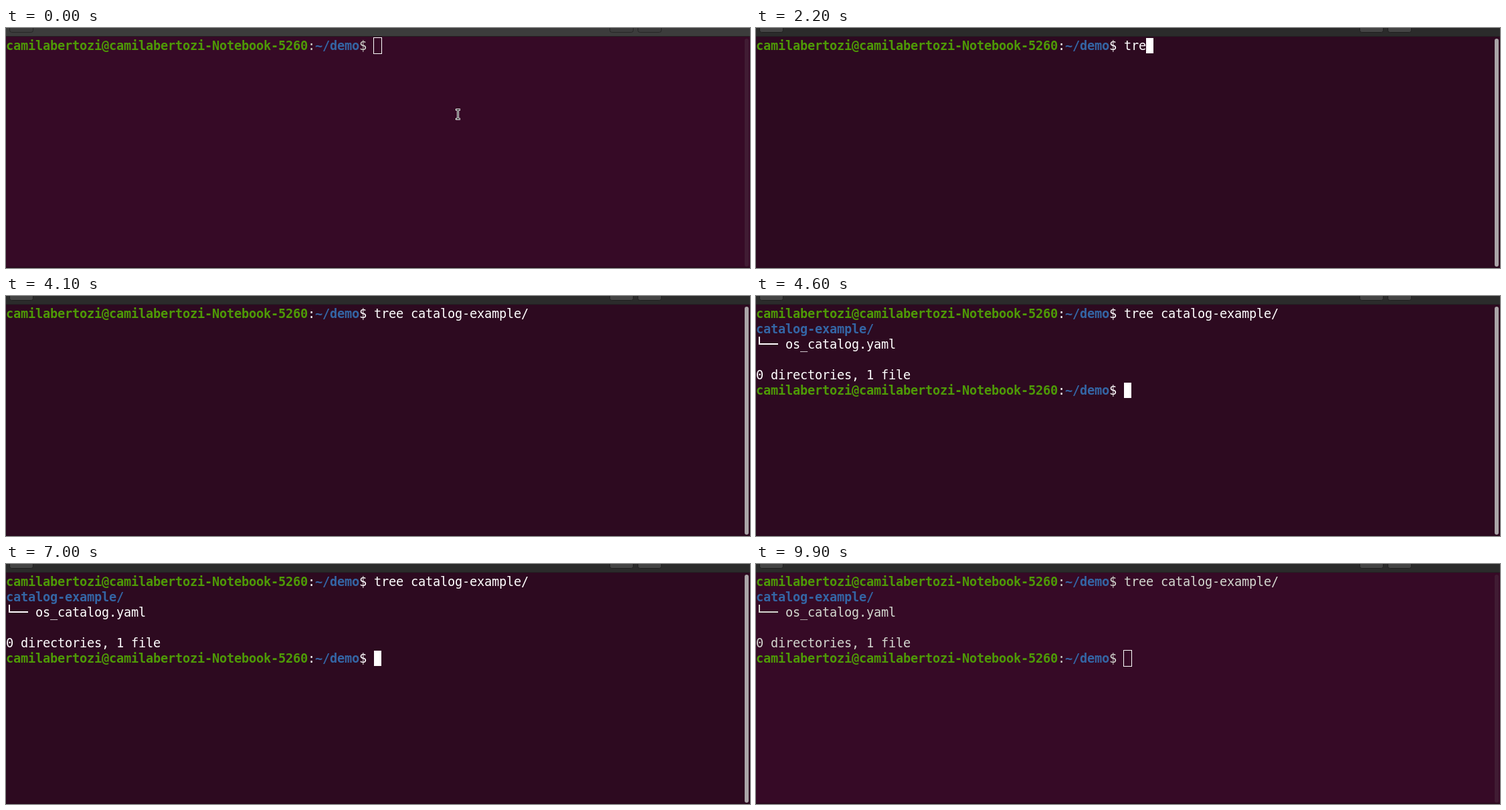
An HTML page for the animation above (10000 ms loop, 1112 by 360 pixels).

```html
<!DOCTYPE html>
<html lang="en">
<head>
<meta charset="utf-8">
<title>Terminal</title>
<style>
html, body { margin: 0; width: 100%; height: 100%; overflow: hidden; background: #2d0a20; }
svg { display: block; width: 1112px; height: 360px; --fg: #fff; --bg: #2d0a20; --bar: #2b2b2b; --btn: #444; --rim: #1f1f1f; }
svg.idle { --fg: #d3d7cf; --bg: #360a26; }
svg.dim { --bar: #3c3c3c; --btn: #3c3c3c; --rim: #262626; }
text { font: 18.667px "DejaVu Sans Mono", monospace; fill: var(--fg); }
.user, .dir { font-weight: bold; }
.user { fill: #4e9a06; }
.dir { fill: #3465a4; }
#bg { fill: var(--bg); }
#bar { fill: var(--bar); }
#buttons rect { fill: var(--btn); stroke: var(--rim); }
#scroll { fill: #aaa5a8; }
.idle #scroll { fill: #401c33; }
#branch { fill: none; stroke: var(--fg); stroke-width: 2; }
#block { fill: #fff; }
#hollow { fill: none; stroke: #fff; }
</style>
</head>
<body>
<svg id="stage" viewBox="0 0 1112 360">
  <rect id="bg" width="1112" height="360"/>
  <rect y="358" width="1112" height="2" fill="#2a0a1e"/>
  <rect id="bar" width="1112" height="13"/>
  <rect y="12" width="1112" height="1" fill="#222"/>
  <g id="buttons">
    <rect x="5.5" y="-20.5" width="35" height="27" rx="3"/>
    <rect x="902.5" y="-20.5" width="35" height="27" rx="3"/>
    <rect x="944.5" y="-20.5" width="35" height="27" rx="3"/>
  </g>
  <rect id="scroll" x="1104" y="16" width="6" height="342" rx="3"/>
  <g id="first"></g>
  <g id="output"><path id="branch" d="M5 61V72H33"/></g>
  <rect id="block" width="11" height="23"/>
  <rect id="hollow" width="12" height="24"/>
  <g id="beam" fill="none">
    <path d="M672 122.5H679M675.5 122V137M672 136.5H679" stroke="#fff" stroke-width="3"/>
    <path d="M673 122.5H678.5M675.5 122V137M673 136.5H678.5" stroke="#000"/>
  </g>
</svg>
<script>
const CELL = 11, LINE = 23, TOP = 15, ASCENT = 18, LOOP = 10000;
const COMMAND = "tree catalog-example/";
const HOST = "camilabertozi@camilabertozi-Notebook-5260";
const PROMPT_COLS = 50, ENTER = 4600, BLINK = 600;
// time and number of characters on the command line
const KEYS = [[1500, 1], [1700, 2], [2200, 3], [2400, 4], [2700, 5],
              [3000, 6], [3100, 7], [3200, 8], [3500, COMMAND.length]];
const $ = id => document.getElementById(id);
const stage = $("stage"), first = $("first"), output = $("output");
const block = $("block"), hollow = $("hollow"), beam = $("beam");

// one x per character keeps the text on the terminal grid
function write(parent, col, row, str, cls = "") {
  const el = document.createElementNS("http://www.w3.org/2000/svg", "text");
  el.setAttribute("x", [...str].map((_, i) => (col + i) * CELL).join(" "));
  el.setAttribute("y", TOP + row * LINE + ASCENT);
  el.setAttribute("class", cls);
  el.textContent = str;
  parent.append(el);
  return el;
}

function prompt(parent, row) {
  write(parent, 0, row, HOST, "user");
  write(parent, 41, row, ":");
  write(parent, 42, row, "~/demo", "dir");
  write(parent, 48, row, "$");
}

prompt(first, 0);
const command = write(first, PROMPT_COLS, 0, COMMAND);
write(output, 0, 1, "catalog-example/", "dir");
write(output, 4, 2, "os_catalog.yaml");
write(output, 0, 4, "0 directories, 1 file");
prompt(output, 5);

const show = (el, on) => el.setAttribute("visibility", on ? "visible" : "hidden");
const within = (t, a, b) => t >= a && t < b;

function place(el, x, y) {
  el.setAttribute("x", x);
  el.setAttribute("y", y);
}

function draw(t) {
  const idle = !within(t, 500, 9900), entered = t >= ENTER;
  const typed = KEYS.reduce((n, [at, count]) => t >= at ? count : n, 0);
  const lit = entered
    ? Math.floor((t - ENTER) / BLINK) % 2 === 0
    : !within(t, 1000, 1500) && t < 4100;

  stage.classList.toggle("idle", idle);
  stage.classList.toggle("dim", t < 500);
  command.textContent = COMMAND.slice(0, typed);
  show(output, entered);

  const x = (PROMPT_COLS + (entered ? 0 : typed)) * CELL;
  const y = TOP + (entered ? 5 * LINE : 0);
  place(block, x, y);
  place(hollow, x - 0.5, y - 0.5);
  show(block, !idle && lit);
  show(hollow, idle);

  show(beam, t < 1400 || within(t, 9200, 9400));
  const shift = t < 9200 ? "0 0" : t < 9300 ? "-130 -82" : "-176 -114";
  beam.setAttribute("transform", `translate(${shift})`);
}

const start = performance.now();
function tick() {
  draw((performance.now() - start) % LOOP);
  requestAnimationFrame(tick);
}
draw(0);
requestAnimationFrame(tick);
</script>
</body>
</html>
```
